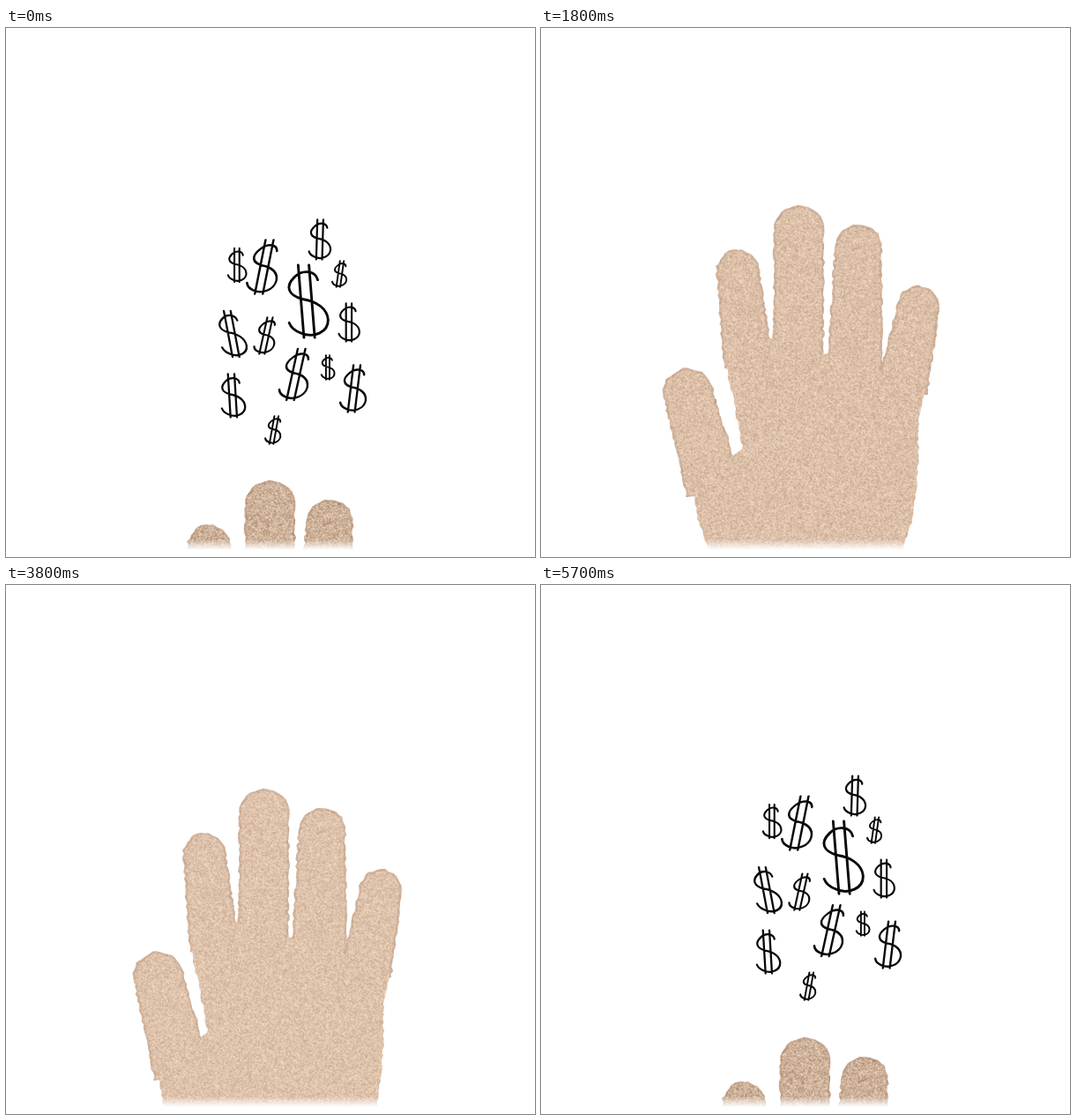
Animation, 600 px wide and 600 px high, one loop 5800 ms. Source, as an HTML page with a canvas:

```html
<!DOCTYPE html>
<html lang="en">
<head>
<meta charset="utf-8">
<title>Hand and dollars</title>
<style>
html, body { margin: 0; width: 100%; height: 100%; overflow: hidden; background: #fff; }
canvas { display: block; }
</style>
</head>
<body>
<canvas id="stage" width="600" height="600"></canvas>
<script>
const ctx = document.getElementById('stage').getContext('2d');
const STEP = 100, FRAMES = 58, HALF = 29;
const GRAB = 1400, RELEASE = 4300; // signs are hidden between these times
const TIP_Y = 260;

const lerp = (a, b, u) => a + (b - a) * u;
const clamp = v => Math.max(0, Math.min(1, v));
const smooth = u => u * u * (3 - 2 * u);

function random(seed) {
  return () => {
    seed = (seed * 1664525 + 1013904223) >>> 0;
    return seed / 4294967296;
  };
}

// ---- Hand ----

// Each finger is a tapered capsule: x, y and radius at the tip and at the base
const fingers = [
  { tip: [179, 474, 29], base: [205, 590, 34], flex: 2 },
  { tip: [227, 335, 24.5], base: [238, 445, 28.5], flex: 1 },
  { tip: [293, 289, 28.5], base: [292, 445, 28.5], flex: 1 },
  { tip: [357, 308, 26.5], base: [354, 455, 32], flex: 1 },
  { tip: [422, 376, 24.5], base: [405, 475, 30.5], flex: 1 }
];

const palm = [
  [210, 440], [229, 537], [171, 575], [178, 616], [196, 665], [196, 775],
  [405, 775], [406, 665], [421, 616], [427, 575], [428, 505], [435, 470],
  [411, 455], [383, 447], [350, 436], [320, 428], [290, 420], [262, 409], [235, 420]
];

function makeFabric() {
  const n = 512, c = document.createElement('canvas');
  c.width = c.height = n;
  const g = c.getContext('2d'), img = g.createImageData(n, n);
  const r = random(7), field = Array.from({ length: n * n }, () => r() - .5);
  for (let i = 0; i < n * n; i++) {
    const at = d => field[(i + d) % (n * n)];
    const v = (at(0) + at(1) + at(n) + at(n + 1)) * 17 + at(0) * 14;
    img.data.set([205 + v, 177 + v * 1.05, 153 + v * 1.1, 255], i * 4);
  }
  g.putImageData(img, 0, 0);
  return ctx.createPattern(c, 'repeat');
}
const fabric = makeFabric();

// Closed path through the points with a fuzzy edge
function fuzzy(pts, seed) {
  const path = new Path2D(), r = random(seed);
  const jitter = () => (r() - .5) * 2.6;
  pts.forEach(([x, y], i) => {
    const [nx, ny] = pts[(i + 1) % pts.length];
    const n = Math.max(1, Math.round(Math.hypot(nx - x, ny - y) / 4));
    for (let j = 0; j < n; j++) {
      path.lineTo(lerp(x, nx, j / n) + jitter(), lerp(y, ny, j / n) + jitter());
    }
  });
  path.closePath();
  return path;
}

function fingerPath({ tip, base, flex }, fan, seed) {
  const shift = fan * flex * (tip[0] - 300);
  const [x, y, r] = tip, [bx, by, br] = base;
  const foot = bx + shift / 2;
  const pts = [[foot - br, by]];
  for (let i = 0; i <= 16; i++) {
    const a = Math.PI * (1 + i / 16);
    pts.push([x + shift + r * Math.cos(a), y + r * Math.sin(a)]);
  }
  pts.push([foot + br, by]);
  return fuzzy(pts, seed);
}

function tipHeight(t) {
  if (t < 200) return lerp(513, 452, t / 200);
  if (t < 400) return lerp(452, 377, (t - 200) / 200);
  return lerp(377, 84, (t - 400) / 1000);
}

function drawHand(t) {
  const away = Math.abs(t - 800);
  const fan = .05 * clamp(away / 200);
  const slide = 7 * clamp(1 - t / 800);
  const light = .42 * (1 - away / 800);

  const fill = path => {
    ctx.fillStyle = fabric;
    ctx.fill(path);
    ctx.fillStyle = `rgba(250,222,202,${light})`;
    ctx.fill(path);
  };

  ctx.save();
  ctx.translate(slide, Math.round(tipHeight(t) - TIP_Y));
  fingers.forEach((finger, i) => {
    const path = fingerPath(finger, fan, 41 + i * 977);
    fill(path);
    ctx.save();
    ctx.clip(path);
    ctx.lineWidth = 5;
    ctx.strokeStyle = 'rgba(150,110,95,.18)';
    ctx.stroke(path);
    ctx.restore();
  });
  fill(fuzzy(palm, 5));
  ctx.restore();

  const fade = ctx.createLinearGradient(0, 580, 0, 592);
  fade.addColorStop(0, 'rgba(255,255,255,0)');
  fade.addColorStop(1, '#fff');
  ctx.fillStyle = fade;
  ctx.fillRect(0, 580, 600, 20);
}

// ---- Dollar signs ----

// x, y, height, lean
const signs = [
  [262, 269, 39, 0], [293, 271, 62, .2], [356, 240, 46, .03], [379, 279, 30, .14],
  [341, 310, 84, -.08], [389, 334, 44, 0], [256, 347, 53, -.19], [295, 349, 42, .22],
  [329, 393, 59, .22], [365, 385, 28, 0], [395, 409, 54, .12], [257, 417, 50, -.06],
  [304, 456, 32, .18]
];

function drawSign(x, y, h, lean) {
  const w = h * .54, p = new Path2D();
  const curve = (...c) => p.bezierCurveTo(...c.map((v, i) => v * (i % 2 ? h : w)));
  p.moveTo(.32 * w, -.29 * h);
  curve(.28, -.42, -.05, -.43, -.25, -.33);
  curve(-.52, -.2, -.45, -.08, -.1, -.03);
  curve(.25, 0, .5, .1, .5, .25);
  curve(.48, .42, .1, .5, -.2, .43);
  curve(-.35, .4, -.45, .35, -.48, .29);
  for (const side of [-.14, .13]) {
    p.moveTo(side * w, -.49 * h);
    p.lineTo(side * w, .49 * h);
  }
  ctx.save();
  ctx.translate(x, y);
  ctx.transform(1, 0, -lean, 1, 0, 0);
  ctx.lineWidth = 1.4 + h * .018;
  ctx.stroke(p);
  ctx.restore();
}

function drawSigns(t) {
  if (t >= GRAB && t < RELEASE) return;
  const lift = t < GRAB
    ? 33 * (1 - (1 - clamp(t / 800)) ** 2)
    : 48 * (1 - smooth(clamp((t - 4600) / 1200)));
  ctx.strokeStyle = '#080808';
  ctx.lineCap = ctx.lineJoin = 'round';
  for (const [x, y, h, lean] of signs) drawSign(x, y - lift, h, lean);
}

function draw(now) {
  const frame = Math.floor(now / STEP) % FRAMES;
  const beat = frame % HALF;
  ctx.fillStyle = '#fff';
  ctx.fillRect(0, 0, 600, 600);
  drawSigns(frame * STEP);
  drawHand(Math.min(beat, HALF - 1 - beat) * STEP);
}

const start = performance.now();
function tick() {
  draw(performance.now() - start);
  requestAnimationFrame(tick);
}
tick();
</script>
</body>
</html>
```
